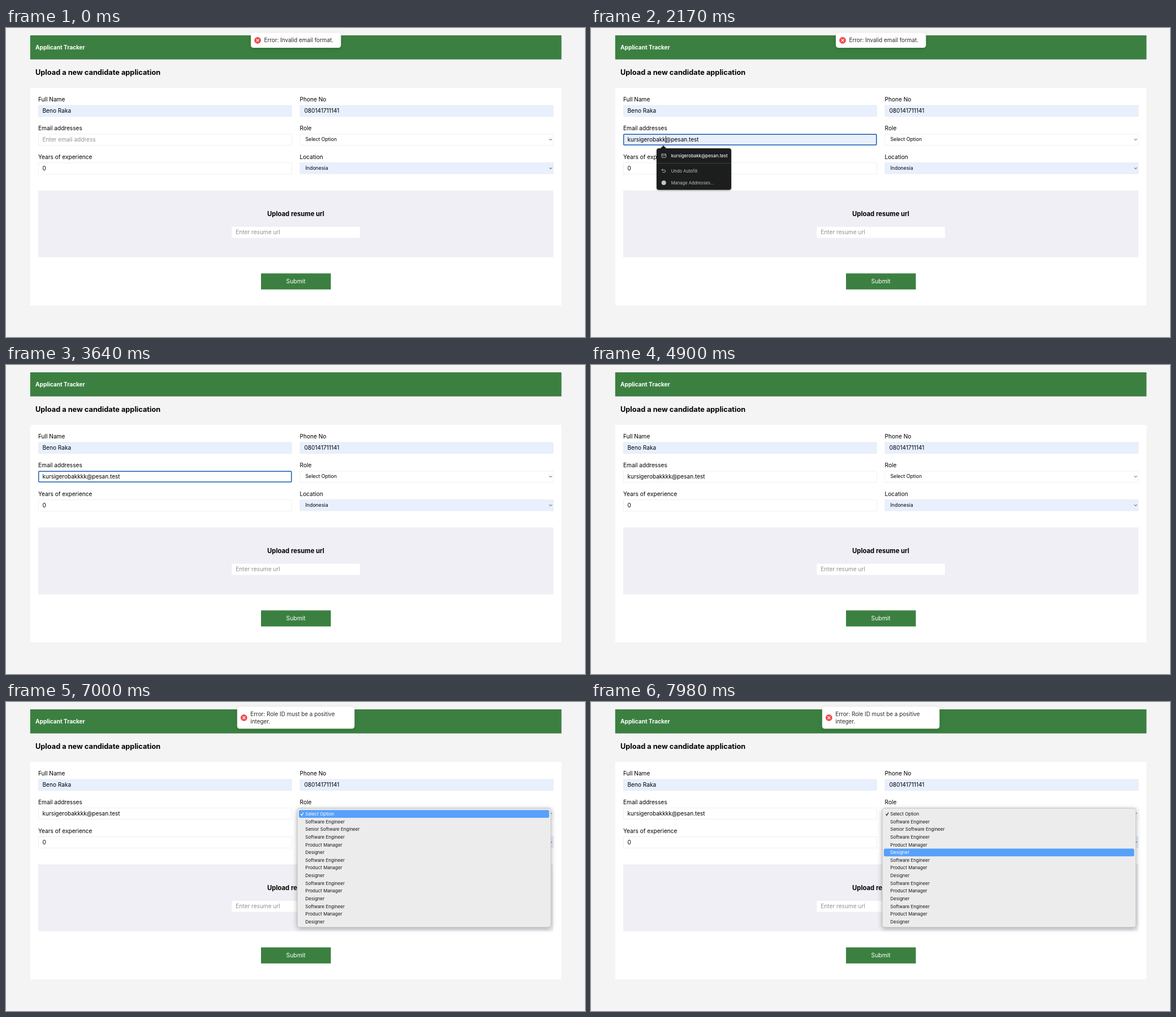
Recreate the animation shown at these times as an HTML page. Size 1024 by 547 pixels, loop 8 s.

```html
<!DOCTYPE html>
<html lang="en">
<head>
<meta charset="utf-8">
<title>Applicant Tracker</title>
<style>
  html, body { margin: 0; width: 100%; height: 100%; overflow: hidden; background: #f4f4f4; }
  svg { display: block; width: 100vw; height: 100vh; font-family: Inter, "Open Sans", sans-serif; }
  text { font-size: 10.1px; fill: #000; white-space: pre; }
  .hint { fill: #929297; }
  .small { font-size: 8.75px; }
  .white { fill: #fff; }
  .bold { font-weight: 700; }
  .mid { text-anchor: middle; }
  .toast text { font-size: 9.9px; fill: #2b2b2b; }
  .toast, .toast .icon, .toast .icon line { transform-box: fill-box; transform-origin: center; }
  .card { fill: #fff; filter: drop-shadow(0 2px 3px rgba(0, 0, 0, .13)); }
  .menu-box { fill: #ececec; stroke: #b9b9b9; stroke-width: .6; filter: drop-shadow(0 2px 4px rgba(0, 0, 0, .32)); }
  .menu text { font-size: 8px; fill: #151515; }
  .popup-box { fill: #1c1d1d; filter: drop-shadow(0 1px 1.5px rgba(0, 0, 0, .35)); }
  .popup text { font-size: 7.6px; fill: #bfc1c0; }
  .popup .mail { font-size: 7.8px; font-weight: 500; fill: #f1f1f1; }
</style>
</head>
<body>
<svg id="stage" viewBox="0 0 1024 547" preserveAspectRatio="none"></svg>
<script>
const LOOP = 8000, TICK = 70;
const USER = 'kursigeroba', HOST = '@pesan.test';
const BLUE = '#e8f0fe';
const stage = document.getElementById('stage');

function add(parent, tag, attrs = {}, content) {
  const el = document.createElementNS('http://www.w3.org/2000/svg', tag);
  for (const key in attrs) el.setAttribute(key, attrs[key]);
  if (content !== undefined) el.textContent = content;
  parent.appendChild(el);
  return el;
}
const group = (name, parent = stage) => add(parent, 'g', { class: name });
const box = (parent, x, y, width, height, fill, more) =>
  add(parent, 'rect', { x, y, width, height, ...(fill && { fill }), ...more });
const label = (parent, x, y, content, name = '') =>
  add(parent, 'text', { x, y, class: name }, content);
const show = (el, on) => { el.style.display = on ? '' : 'none'; };

// Page
function field(x, y, fill) {
  return box(stage, x + .3, y + .3, 448.1, 19.6, fill,
    { stroke: '#e4e6ea', 'stroke-width': .6 });
}
function chevron(y) {
  add(stage, 'path', { d: `M960.8 ${y - 1.1}l2.4 2.4 2.4-2.4`, fill: 'none', stroke: '#222', 'stroke-width': .9 });
}
box(stage, 0, 0, 1024, 547, '#f4f4f4');
box(stage, 42.8, 13, 939.6, 42.6, '#3b8041');
label(stage, 52, 37.8, 'Applicant Tracker', 'bold white');
label(stage, 52, 82.5, 'Upload a new candidate application', 'bold').style.fontSize = '12.75px';
box(stage, 42.8, 106, 939.6, 385, '#fff');

const left = 57, right = 519.6;
[['Full Name', 'Phone No'], ['Email addresses', 'Role'], ['Years of experience', 'Location']]
  .forEach((pair, i) => pair.forEach((name, j) =>
    label(stage, j ? right : left, 130.4 + i * 51, name)));

field(left, 136.6, BLUE);
field(right, 136.6, BLUE);
const mailField = field(left, 187.5, '#fff');
field(right, 187.5, '#fff');
field(left, 238.4, '#fff');
field(right, 238.2, BLUE);
label(stage, 64.5, 150, 'Beno Raka');
label(stage, 527.5, 150, '080141711141');
label(stage, 64.5, 252.2, '0');
label(stage, 529.5, 200.4, 'Select Option', 'small');
label(stage, 529.5, 251.1, 'Indonesia', 'small');
chevron(197.4);
chevron(248.2);

box(stage, 57, 287.5, 911, 118.2, '#f0eff5');
label(stage, 512.5, 332.8, 'Upload resume url', 'bold mid').style.fontSize = '11.3px';
box(stage, 399.3, 352, 226.7, 19.5, '#fff');
label(stage, 406.3, 365.4, 'Enter resume url', 'hint');
box(stage, 451, 434.4, 123.5, 28.4, '#3b8041');
label(stage, 512.6, 452, 'Submit', 'white mid').style.fontSize = '10.4px';

// Email input
const ring = box(stage, 57.7, 188.2, 447.1, 18.8, 'none',
  { rx: 1.2, stroke: '#1a5db4', 'stroke-width': 1.5 });
const mail = label(stage, 64.5, 201, '');
const caret = box(stage, 0, 191, .8, 13, '#000');

// Autofill popup
const popup = group('popup');
const popupBox = add(popup, 'path', { class: 'popup-box' });
const hover = add(popup, 'path', { d: 'M117 239V217q0-3 3-3h124q3 0 3 3v22z', fill: '#303332' });
box(popup, 116, 239, 132, .7, '#4b4d4c');
const envelope = { fill: 'none', stroke: '#c9cbca', 'stroke-width': .9 };
box(popup, 125, 223, 7.6, 6.2, 'none', { ...envelope, rx: .7 });
add(popup, 'path', { d: 'M125.2 223.8l3.6 2.5 3.6-2.5', ...envelope });
label(popup, 141.7, 229, USER + 'kk' + HOST, 'mail');
const undo = group('', popup);
add(undo, 'path', { d: 'M127 249.2l-2 2 2 2M125 251.2h4.4a2.2 2.2 0 0 1 0 4.4h-3', ...envelope });
label(undo, 141.7, 255.7, 'Undo Autofill');
const manage = group('', popup);
add(manage, 'circle', { cx: 128.7, cy: 253, r: 4, fill: '#c4c6c5' });
label(manage, 141.7, 255.7, 'Manage Addresses…');

function drawPopup(extra) {
  const bottom = 265.6 + extra;
  popupBox.setAttribute('d', `M120 213h3l5-5 5 5h111q4 0 4 4V${bottom - 4}q0 4-4 4H120q-4 0-4-4V217q0-4 4-4z`);
  manage.setAttribute('transform', `translate(0 ${extra})`);
  show(undo, extra > 0);
}

// Toasts
function makeToast(x, y, width, height, lines) {
  const el = group('toast'), cy = y + height / 2;
  box(el, x, y, width, height, null, { class: 'card', rx: 4.5 });
  const icon = group('icon', el), cx = x + 12;
  add(icon, 'circle', { cx, cy, r: 5.9, fill: '#f04b4f' });
  const cross = [1, -1].map(s => add(icon, 'line', {
    x1: cx - 2.4, x2: cx + 2.4, y1: cy - 2.4 * s, y2: cy + 2.4 * s,
    stroke: '#fff', 'stroke-width': 1.1
  }));
  lines.forEach((line, i) => label(el, x + 23.5, 25 + i * 12.6, line));
  return { el, icon, cross };
}
const oldToast = makeToast(433, 8.5, 159.4, 26.6, ['Error: Invalid email format.']);
const newToast = makeToast(408.8, 8.5, 207.6, 38.7, ['Error: Role ID must be a positive', 'integer.']);

const motions = [];
function move(el, delay, duration, easing, from, to) {
  const anim = el.animate([from, to], { delay, duration, easing, fill: 'both' });
  anim.pause();
  motions.push(anim);
}
const pose = (y, scale, opacity) => ({ transform: `translateY(${y}%) scale(${scale})`, opacity });
move(oldToast.el, 3270, 400, 'cubic-bezier(.06,.71,.55,1)', pose(0, 1, 1), pose(-150, .6, 0));
move(newToast.el, 5020, 350, 'cubic-bezier(.21,1.02,.73,1)', pose(-200, .6, .5), pose(0, 1, 1));
move(newToast.icon, 5120, 300, 'cubic-bezier(.175,.885,.32,1.275)', pose(0, 0, 0), pose(0, 1, 1));
newToast.cross.forEach((line, i) =>
  move(line, 5170 + i * 30, 150, 'ease-out', pose(0, 0, 0), pose(0, 1, 1)));

// Role menu
const menu = group('menu');
const trio = ['Software Engineer', 'Product Manager', 'Designer'];
const roles = ['Select Option', trio[0], 'Senior Software Engineer', ...trio, ...trio, ...trio, ...trio];
const pitch = 13.65, firstRow = 191.3;
box(menu, 515.2, 188.2, 448.4, 210.6, null, { class: 'menu-box', rx: 4 });
const bar = box(menu, 518, firstRow, 442.6, pitch, '#57a0fb', { rx: 2.5 });
const tick = add(menu, 'path', { d: 'M521.3 198.4l1.7 2.2 3.1-5', fill: 'none', 'stroke-width': 1.2 });
const items = roles.map((role, i) => label(menu, 529.3, 200.9 + i * pitch, role));

// Each step: time, then what changes from there on
const steps = [
  [0, { value: '', font: 10.1, fill: '#fff', focus: 0, caret: -1, popup: 0, hover: 0, extra: 0, row: -1 }],
  [350, { focus: 1, caret: 0, popup: 1 }],
  [770, { value: USER + 'kk', font: 7.5, fill: BLUE, hover: 1 }],
  [840, { caret: -1 }],
  [1120, { font: 10, popup: 0, hover: 0, caret: 99 }],
  [1680, { caret: -1 }],
  [2170, { caret: 13, popup: 1, extra: 21 }],
  [2730, { caret: -1 }],
  [3010, { value: USER + 'kkk', fill: '#fff', caret: 14, popup: 0 }],
  [3150, { value: USER + 'kkkk', caret: 15 }],
  [3640, { caret: -1 }],
  [4200, { caret: 15 }],
  [4690, { caret: -1 }],
  [4900, { focus: 0 }],
  [7000, { row: 0 }],
  [7490, { row: 1 }],
  [7700, { row: 2 }],
  [7910, { row: 3 }],
  [7980, { row: 5 }]
];

function render(t) {
  const s = {};
  for (const [at, change] of steps) if (t >= at) Object.assign(s, change);

  const value = s.value && s.value + HOST;
  mail.textContent = value || 'Enter email address';
  mail.setAttribute('class', value ? '' : 'hint');
  mail.style.fontSize = s.font + 'px';
  mailField.setAttribute('fill', s.fill);
  show(ring, s.focus);

  show(caret, s.caret >= 0);
  const chars = Math.min(s.caret, value.length);
  caret.setAttribute('x', 64.6 + (chars > 0 ? mail.getSubStringLength(0, chars) : 0));

  show(popup, s.popup);
  show(hover, s.hover);
  drawPopup(s.extra);

  show(newToast.el, t >= 5040);
  for (const anim of motions) anim.currentTime = t;

  show(menu, s.row >= 0);
  bar.setAttribute('y', firstRow + Math.max(s.row, 0) * pitch);
  items.forEach((el, i) => { el.style.fill = i === s.row ? '#fff' : ''; });
  tick.setAttribute('stroke', s.row === 0 ? '#fff' : '#222');
}

const start = performance.now();
function loop() {
  const t = (performance.now() - start) % LOOP;
  render(Math.floor(t / TICK) * TICK);
  requestAnimationFrame(loop);
}
loop();
</script>
</body>
</html>
```
